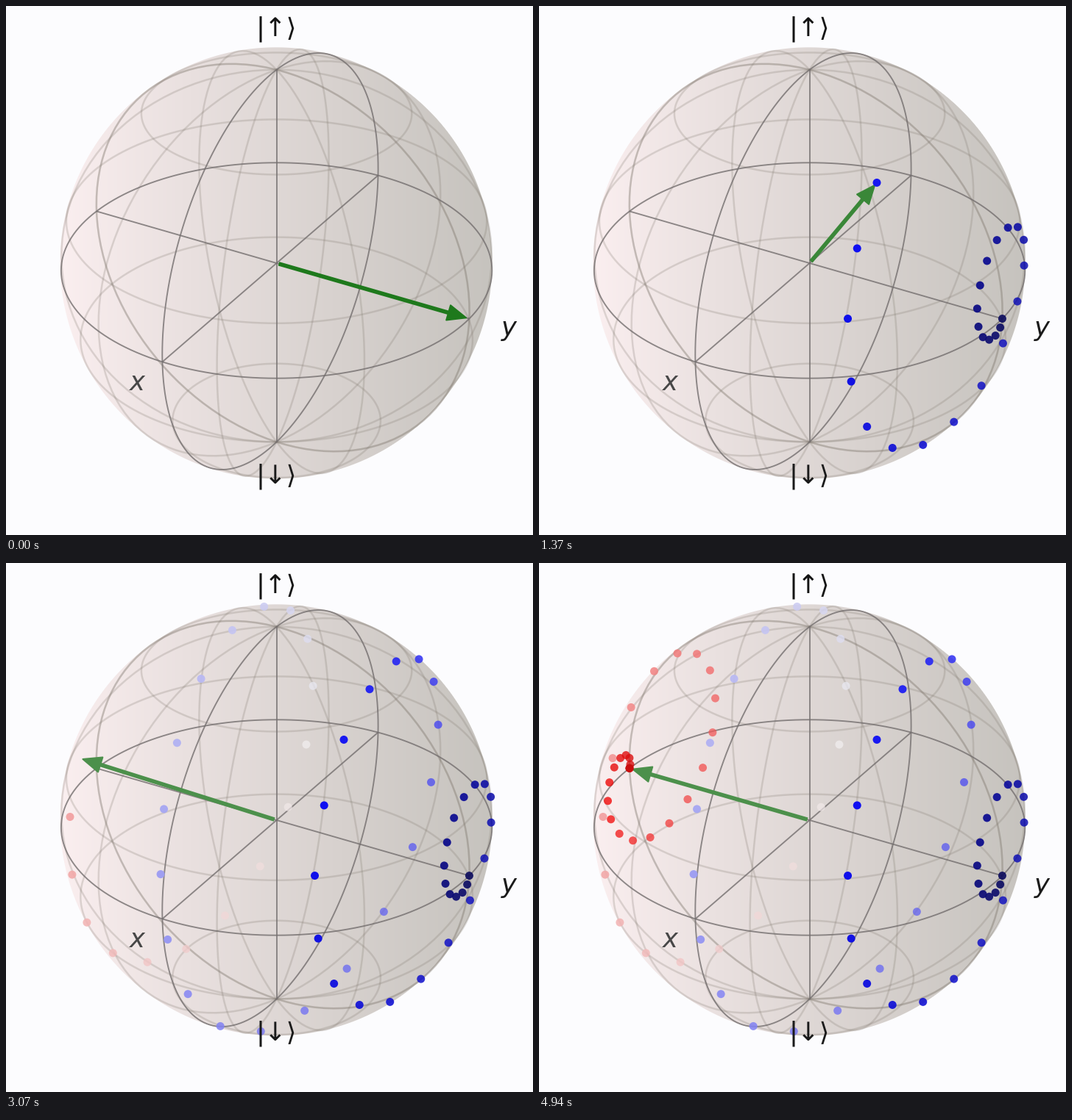
These frames come from a looping animation (716 px wide and 720 px high, 5000 ms). A matplotlib script:

```python
import numpy as np
import matplotlib.pyplot as plt
from matplotlib.animation import FuncAnimation

W, H, DPI = 716, 720, 100
FRAMES, LOOP = 150, 5000
PX = 72 / DPI                       # points per pixel
CENTER = np.array([367.6, 350.0])
DIST, SCALE = 12.72, 3715           # camera distance and zoom, in sphere radii

# Camera at azimuth -60, elevation 30
RIGHT = np.array([0.866, 0.5, 0])
UP = np.array([-0.25, 0.433, 0.866])
TOWARD = np.array([0.433, -0.75, 0.5])


def project(x, y, z):
    """Pixel position and depth of a point in Bloch coordinates."""
    p = np.stack(np.broadcast_arrays(y, -np.asarray(x, float), z), -1)
    depth = p @ TOWARD
    k = SCALE / (DIST - depth)
    return CENTER[0] + k * (p @ RIGHT), CENTER[1] - k * (p @ UP), depth


def spin(k):
    """Spin flip: steady precession about y while tilting from +y to -y."""
    tilt = np.radians(np.minimum(2.27 * k + 2.5 * np.sin(np.pi * k / 75), 180))
    lead = 7.5 * (np.tanh((k - 19.5) / 4) - np.tanh((k - 39.8) / 1.6))
    turn = np.radians(20.75 * k + lead - 88)
    return np.sin(tilt) * np.cos(turn), np.cos(tilt), np.sin(tilt) * np.sin(turn)


LAST = 82
SAMPLES = np.arange(LAST + 1)
px, py, depth = project(*spin(SAMPLES))
PATH = np.column_stack([px, py])
COLORS = plt.get_cmap("seismic")((SAMPLES + 2) / 100)
COLORS[:, :3] = 0.05 + 0.9 * COLORS[:, :3]
COLORS[:, 3] = 0.85 + 0.15 * depth


def backdrop():
    """Shaded ball: light pink on the left to warm grey on the right."""
    y, x = np.mgrid[0:H, 0:W] + 0.5
    t = np.clip((x - 75) / 585, 0, 1)[..., None] ** 0.9
    ball = np.array([251, 239, 240]) * (1 - t) + np.array([198, 195, 190]) * t
    r = np.hypot(x - 367, y - 349.8)
    cover = np.clip(294 - r, 0, 1)[..., None]
    return (np.array([252, 252, 254]) * (1 - cover) + ball * cover) / 255


fig = plt.figure(figsize=(W / DPI, H / DPI), dpi=DPI)
ax = fig.add_axes([0, 0, 1, 1])
ax.axis("off")
ax.imshow(backdrop(), extent=(0, W, H, 0), interpolation="nearest",
          aspect="auto")
ax.set_xlim(0, W)
ax.set_ylim(H, 0)


def curve(x, y, z, color, width, alpha):
    ax.plot(*project(x, y, z)[:2], color=color, lw=width * PX, alpha=alpha,
            solid_capstyle="butt")


def wire(x, y, z):
    curve(x, y, z, (0.50, 0.47, 0.43), 2.5, 0.24)


def frame(x, y, z):
    curve(x, y, z, (0.45, 0.43, 0.43), 1.9, 0.8)


# Wire grid, drawn as two half spheres that share a seam
polar = np.linspace(0, np.pi, 60)
for start in (-180, 0):
    for step in (0, 37.5, 75, 112.5, 150, 180):
        a = np.radians(start + step)
        wire(np.sin(a) * np.sin(polar), np.cos(a) * np.sin(polar),
             np.cos(polar))
circle = np.linspace(0, 2 * np.pi, 181)
for step in (37.5, 75, 112.5, 150):
    a = np.radians(step)
    wire(np.sin(a) * np.sin(circle), np.sin(a) * np.cos(circle), np.cos(a))

# Equator, x-z circle and axes
frame(np.cos(circle), np.sin(circle), 0)
frame(np.cos(circle), 0, np.sin(circle))
span = np.array([-1.0, 1.0])
for axis in np.eye(3):
    frame(*(span * c for c in axis))

for spot, label, shade in [((0, 0, 1.2), "|↑⟩", 0.08),
                           ((0, 0, -1.2), "|↓⟩", 0.1),
                           ((1.2, 0, 0), "$x$", 0.28),
                           ((0, 1.2, 0), "$y$", 0.1)]:
    ax.text(*project(*spot)[:2], label, size=25.5, color=str(shade),
            family="DejaVu Sans", ha="center", va="center", zorder=8)

shaft, = ax.plot([], [], lw=5.6 * PX, solid_capstyle="butt", zorder=5)
head = plt.Polygon(np.zeros((3, 2)), lw=2 * PX, joinstyle="round", zorder=5)
ax.add_patch(head)
dots = ax.scatter([], [], s=(11 * PX) ** 2, linewidths=0, zorder=6)


def sample(n):
    return int(np.clip(np.floor(0.66 * n - 2.1), 0, LAST))


def draw(n):
    k = sample(n)
    delta = PATH[k] - CENTER
    unit = delta / np.hypot(*delta)
    side = np.array([-unit[1], unit[0]])
    tip = PATH[k] - 4.5 * unit
    base = tip - 25 * unit
    mix = min(k / 40, 1)
    green = (np.array([30, 121, 28]) + mix * np.array([46, 23, 47])) / 255
    shaft.set_data(*np.array([CENTER + 3 * unit, base + 2 * unit]).T)
    shaft.set_color(green)
    head.set_xy([tip, base + 10.5 * side, base - 10.5 * side])
    head.set_color(green)
    # The trail runs one step behind the arrow
    count = sample(n - 1) + 1 if n else 0
    dots.set_offsets(PATH[:count])
    dots.set_facecolors(COLORS[:count])
    return shaft, head, dots


anim = FuncAnimation(fig, draw, frames=FRAMES, interval=LOOP / FRAMES,
                     init_func=lambda: draw(0), repeat=True, repeat_delay=0)
plt.show()
```
